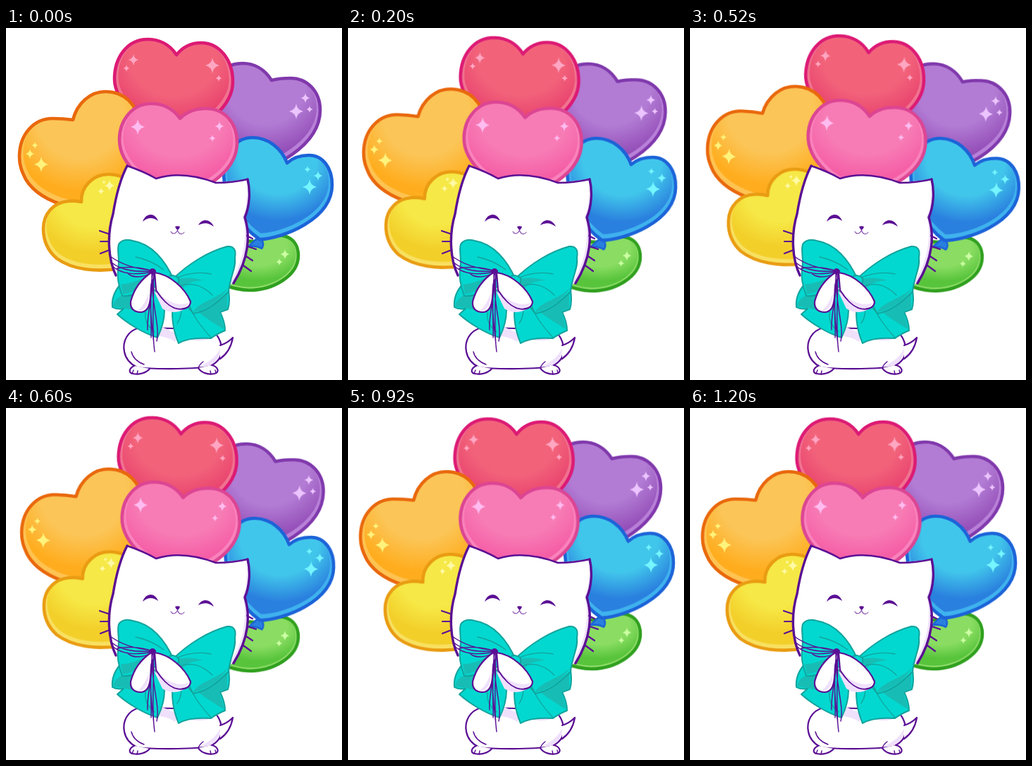
Recreate the animation shown at these times as an HTML page. Size 477 by 498 pixels, loop 1.4 s.

```html
<!DOCTYPE html>
<html lang="en">
<head>
<meta charset="utf-8">
<title>Kitten with heart balloons</title>
<style>
  html, body { margin: 0; width: 100%; height: 100%; overflow: hidden; background: #fff; }
  svg { display: block; width: 100%; height: 100%; }
  #balloons { transform-origin: 208px 320px; animation: sway 1400ms step-end infinite; }
  @keyframes sway {
    0%, 100% { transform: none; }
    14.2857%, 42.8571% { transform: translate(0, -2.2px) rotate(1.3deg); }
    28.5714% { transform: translate(0, -4.8px) rotate(2.35deg); }
    57.1429%, 85.7143% { transform: translate(0, -.6px) rotate(-.55deg); }
    71.4286% { transform: translate(0, -1.4px) rotate(-1.55deg); }
  }
  .core { transform-box: fill-box; transform-origin: 50% 10%; transform: scale(.935); }
  .ink { fill: none; stroke: #5b0f94; stroke-width: 2.2; stroke-linecap: round; stroke-linejoin: round; }
  .thick { stroke-width: 3.4; }
  .thin { stroke-width: 1.4; }
  .mouth { stroke-width: 1.1; opacity: .75; }
  .white { fill: #fff; }
  .solid { fill: #5b0f94; }
  .shade { fill: #efe0fc; }
  .bow { fill: #02d8d0; stroke: #12a39c; stroke-width: 2; stroke-linejoin: round; }
  .dim { fill: #17bdb5; }
  .fold { fill: none; stroke: #12a39c; stroke-width: 1.3; stroke-linecap: round; }
</style>
</head>
<body>
<svg viewBox="0 0 477 498" preserveAspectRatio="none">
  <g id="balloons"></g>

  <g id="body">
    <path class="ink white" d="M190 424C172 428 165 444 168 458C170 469 178 476 186 480C206 483 262 483 288 479C300 474 307 465 306 453C305 440 298 430 288 426Z"/>
    <path class="shade" d="M188 426C200 438 224 432 240 444L246 434L215 420ZM288 478C300 473 304 463 304 453C299 464 290 472 276 478ZM264 441C280 445 294 439 301 433L286 426Z"/>
    <path class="ink white" d="M304 449C311 447 317 443 322 438C320 450 314 461 304 468"/>
    <path class="ink white" d="M182 478C175 481 173 488 180 489C189 491 199 488 204 482M292 477C301 479 304 487 296 489C288 491 277 488 273 481"/>
    <path class="ink thin" d="M181 484L179 489M187 485L186 490M290 485L291 490M297 484L298 488M178 458C180 467 188 473 196 476M280 472C276 475 274 478 273 481"/>
  </g>

  <g id="head">
    <path class="white" d="M172 195L213 213C238 205 266 207 298 219L343 214C347 230 346 252 339 268C347 293 345 326 324 360L240 400L158 354C145 328 144 293 152 263C156 238 162 214 172 195Z"/>
    <path class="shade" d="M341 233C342 248 341 258 336 266C343 292 339 331 316 363L324 361C345 327 347 292 340 268C343 256 344 246 341 233Z"/>
    <path class="ink thick" d="M156 350C145 327 143 293 152 263C156 238 162 214 172 195M343 214C347 230 346 252 339 268C347 293 345 326 323 361"/>
    <path class="ink" style="stroke-width:2.6" d="M172 195C187 200 201 206 213 213C238 205 266 207 298 219C314 219 330 217 343 214"/>
    <path class="ink" d="M133 287L145 291M134 302L145 302M134 319L147 314M342 294L350 298M343 309L355 313M341 323L350 329M337 336L348 344"/>
    <path class="solid" d="M194 274C198 262 211 260 216 273C208 267 201 268 194 274ZM273 279C278 269 290 270 295 281C287 275 281 275 273 279ZM240 281C242 280 245 280 247 281C246 284 245 285 243.500 286C242 285 241 283 240 281Z"/>
    <path class="ink mouth" d="M234 288C236 292 241 292 243.500 286C245 292 250 293 253 289"/>
  </g>

  <g id="bow">
    <path class="bow" d="M163 362C153 373 150 385 151 395C156 398 161 398 167 397L158 405C171 417 195 432 215 438C221 426 225 413 225 399L204 358Z"/>
    <path class="bow" d="M238 385C235 400 234 420 245 446C256 439 275 438 291 439C299 433 306 430 311 428C311 418 308 410 304 402L315 398C318 388 317 380 316 370L290 360Z"/>
    <path class="dim" d="M166 378C178 374 190 370 200 362L205 398C195 402 180 400 167 396L152 394C153 386 158 381 166 378ZM252 386C270 400 294 392 314 376L314 397L303 402C305 410 309 418 309 426C290 415 272 402 252 386Z"/>
    <path class="bow" d="M238 356C226 328 206 305 180 301C173 299 165 298 160 306C157 315 162 326 159 342C157 354 161 368 165 379C177 381 198 371 226 361Z"/>
    <path class="bow" d="M236 356C259 333 288 316 314 309C324 308 327 315 325 324C327 341 318 351 316 373C305 383 290 400 266 404C254 390 245 376 236 356Z"/>
    <path class="dim" d="M238 357C252 352 266 353 280 357C264 358 257 361 250 369ZM166 377C181 374 196 367 206 352C187 356 171 364 163 362ZM266 402C272 388 298 384 315 368C307 381 290 398 266 402Z"/>
    <path class="fold" d="M242 354C258 346 278 345 291 348M247 365C265 359 280 365 293 378M259 388C265 407 274 419 291 438M248 386C250 400 249 409 243 418M224 342C208 330 194 326 184 324M229 351C214 350 203 353 193 358M198 402C197 414 200 421 211 430"/>
    <path class="bow" d="M230 353C234 348 241 350 245 354C246 362 243 369 236 369Z"/>
  </g>

  <g id="paws">
    <path class="shade" d="M210 372L231 389L253 398C243 404 231 403 222 397Z"/>
    <path class="ink white" d="M206 346C190 357 181 371 177 387C176 397 182 402 191 402C200 402 204 393 205 382L211 346Z"/>
    <path class="shade" d="M203 375C203 391 197 401 187 400C195 394 198 386 203 375Z"/>
    <path class="ink white" d="M211 346C233 349 254 368 262 387C262 396 251 400 239 396C229 392 221 383 213 371Z"/>
    <path class="shade" d="M216 373C228 388 245 394 259 389C256 397 247 398 239 395C229 391 222 382 216 373Z"/>
    <path class="ink thin" d="M208 343C186 341 164 335 148 323M208 344C186 345 164 344 149 331M208 345C186 349 166 350 151 337M208 344C190 337 168 338 158 340M208 346C194 354 178 354 172 346"/>
    <path class="ink thin" d="M207 346C208 382 199 414 201 427M208 346C203 383 207 421 206 438M209 346C211 383 206 421 211 458M208 356C206 391 219 420 214 443M206 362C203 390 207 418 211 458"/>
    <path class="ink solid" d="M204 344C206 340 210 340 212 344C211 347 206 348 204 344Z"/>
  </g>
</svg>

<script>
  const NS = "http://www.w3.org/2000/svg";
  const root = document.getElementById("balloons");

  function add(parent, tag, attrs) {
    const el = document.createElementNS(NS, tag);
    for (const k in attrs) el.setAttribute(k, attrs[k]);
    parent.appendChild(el);
    return el;
  }

  // colours: top, bottom, rim, outline, sparkle; stars: x, y, radius
  const balloons = [
    { id: "purple", colors: ["#b27cd4", "#9550b9", "#b880d8", "#8039ac", "#ecc4ff"],
      d: "M377 74C367 58 352 50 336 50C312 50 290 66 290 100C290 140 320 180 350 205C372 200 446 170 446 116C446 90 428 71 404 71C393 71 384 72 377 74Z",
      stars: [[412, 118, 11], [425, 99, 7], [431, 115, 5]] },
    { id: "green", colors: ["#8add62", "#58c43c", "#8edd68", "#30a01f", "#ccffa4"],
      d: "M360 302C385 286 415 292 415 322C415 350 380 371 345 371C330 371 318 367 305 362L300 300Z",
      stars: [[396, 320, 7], [388, 331, 5]] },
    { id: "red", colors: ["#f2637a", "#e8406d", "#f07390", "#dc1a74", "#ffa6c2"],
      d: "M242 38C232 22 216 16 201 16C172 16 154 42 154 72C154 108 196 134 238 160C284 138 322 112 322 76C322 44 302 21 277 21C262 21 250 28 242 38Z",
      stars: [[293, 53, 11], [302, 71, 5], [181, 45, 8], [171, 57, 5]] },
    { id: "orange", colors: ["#fbc557", "#ffad1e", "#ffc352", "#e9680c", "#fff37c"],
      d: "M95 130C101 106 120 90 141 90C168 90 186 108 190 135C194 175 182 215 162 262C128 260 54 257 28 214C22 202 19 194 19 182C19 150 40 128 66 128C78 128 88 129 95 130Z",
      stars: [[50, 193, 11], [34, 178, 7], [41, 166, 5]] },
    { id: "yellow", colors: ["#f6e846", "#f3cf2a", "#f8e060", "#e99c12", "#fffaa6"],
      d: "M107 246C106 224 124 207 145 207C175 207 195 230 192 262C188 300 175 330 165 340C128 346 94 342 72 326C58 314 53 298 53 284C53 262 68 247 88 245C96 244 102 245 107 246Z",
      stars: [[147, 223, 8], [135, 231, 5], [139, 218, 3]] },
    { id: "blue", colors: ["#41c6eb", "#2a80de", "#3fb2ee", "#1c63d8", "#74f5ff"],
      d: "M399 191C391 170 372 155 350 155C324 155 308 180 309 208C310 245 332 280 360 299C392 298 463 271 463 222C463 198 450 180 430 180C416 180 407 184 399 191Z",
      stars: [[431, 225, 11], [443, 209, 7], [428, 200, 5]] },
    { id: "pink", colors: ["#f77cb5", "#f55ea6", "#f983bc", "#dc4593", "#ffbcf0"],
      d: "M247 128C237 114 222 107 206 107C180 107 161 130 161 158C161 196 205 226 245 240C290 226 328 200 328 162C328 134 310 114 284 114C268 114 255 120 247 128Z",
      stars: [[187, 140, 11], [303, 139, 7], [293, 156, 5]] }
  ];

  function sparkle([x, y, r]) {
    const n = r * 0.2, w = r * 0.9;
    return `M${x} ${y - r}Q${x + n / 2} ${y - n} ${x + w} ${y}Q${x + n / 2} ${y + n} ${x} ${y + r}` +
           `Q${x - n / 2} ${y + n} ${x - w} ${y}Q${x - n / 2} ${y - n} ${x} ${y - r}Z`;
  }

  for (const { id, d, colors: [top, bottom, rim, line, glow], stars } of balloons) {
    const g = add(root, "g", { id });
    const grad = add(g, "radialGradient", { id: id + "Fill", cx: 0.5, cy: 0.2, r: 0.7 });
    [[0, top], [0.55, top], [0.95, bottom]].forEach(([offset, color]) =>
      add(grad, "stop", { offset, "stop-color": color }));

    if (id === "blue") {
      add(g, "path", { d: "M357 297C352 302 346 306 345 309C352 308 358 309 363 312C367 307 365 301 360 297Z",
        fill: bottom, stroke: line, "stroke-width": 2.5, "stroke-linejoin": "round" });
    }
    add(g, "path", { d, fill: rim });
    add(g, "path", { d, class: "core", fill: `url(#${id}Fill)` });
    add(g, "path", { d, fill: "none", stroke: line, "stroke-width": 4.6, "stroke-linejoin": "round" });
    add(g, "path", { d: stars.map(sparkle).join(""), fill: glow });
  }
</script>
</body>
</html>
```
